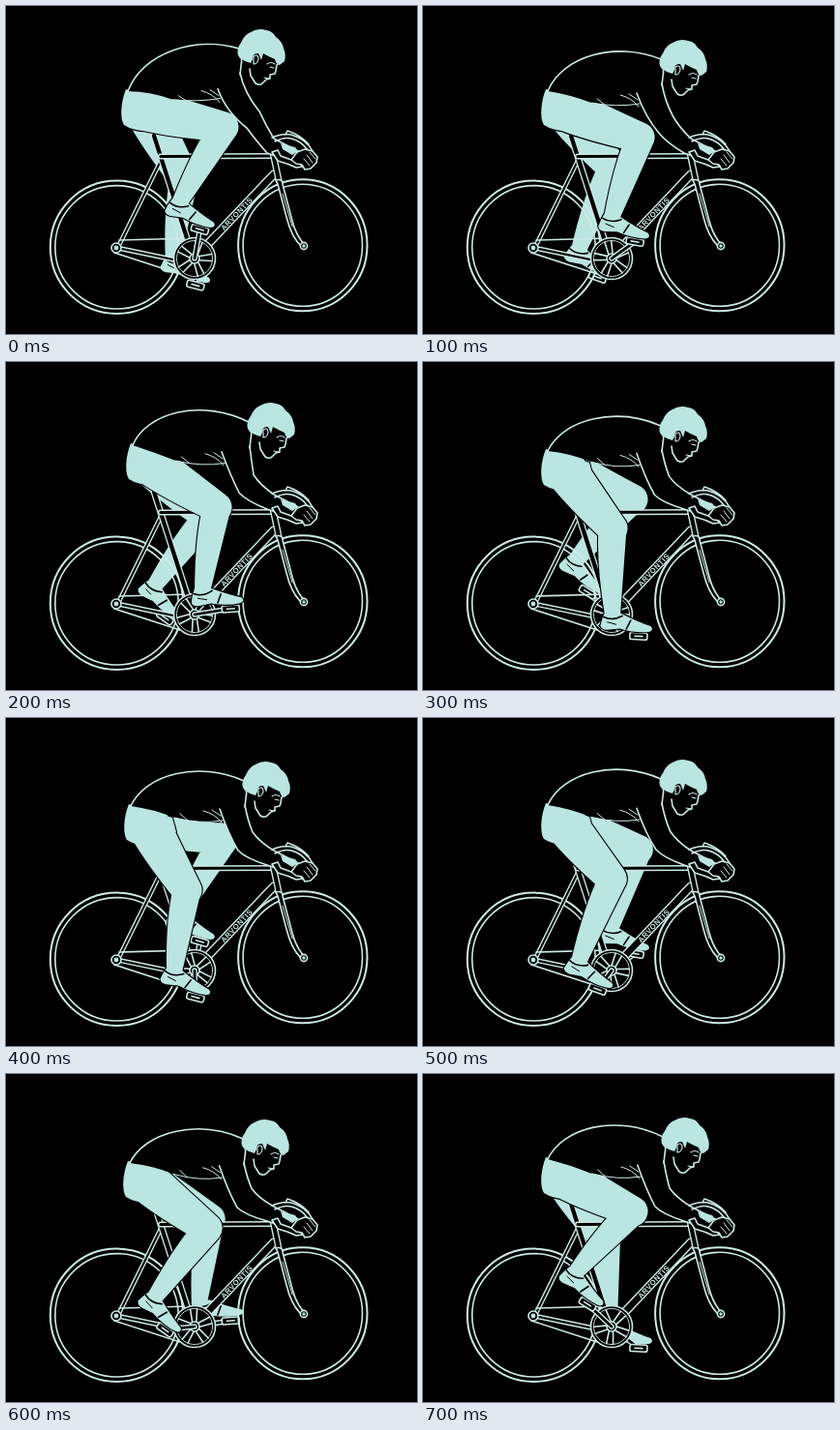
Recreate the animation shown at these times as an HTML page. Size 425 px wide and 339 px high, loop 0.8 s.

```html
<!DOCTYPE html>
<html lang="en">
<head>
<meta charset="utf-8">
<title>Cyclist</title>
<style>
  html, body { margin: 0; width: 100%; height: 100%; overflow: hidden; background: #000; }
  svg { display: block; width: 100vw; height: 100vh; }
  .line { fill: none; stroke: #cdeae4; stroke-width: 1.6; stroke-linecap: round; stroke-linejoin: round; }
  .solid { fill: #bae5e0; }
  .leg { fill: #bae5e0; stroke: #000; stroke-width: 2.2; paint-order: stroke; stroke-linejoin: round; }
  .ink { fill: none; stroke: #000; stroke-width: 1.6; stroke-linecap: round; }
  .mask { fill: #000; }
  text { font: bold 7.6px "Liberation Sans", Arial, sans-serif; fill: #cdeae4; letter-spacing: .6px; }
</style>
</head>
<body>
<svg viewBox="0 0 425 339" preserveAspectRatio="none">
  <rect width="425" height="339" class="mask"/>
  <g id="farLeg"></g>
  <g id="farPedal"></g>
  <g id="bike"></g>
  <g transform="translate(195 261)">
    <circle r="21.5" class="line" style="fill:#000"/>
    <circle r="18.5" class="line" stroke-dasharray="3 1" style="stroke-width:1"/>
    <g id="spider"></g>
    <circle r="5" class="line" style="fill:#000"/>
    <circle r="1.6" class="solid"/>
  </g>
  <g id="nearPedal"></g>
  <g id="nearLeg"></g>
  <g id="body"></g>
  <g>
    <path class="line" d="M275 136Q286 131 295 133Q311 138 317 150M278 140Q288 135 295 137Q306 140 312 149M289 133L291 129Q304 133 313 143"/>
    <path class="line" style="fill:#000" d="M275 151L281 160Q292 163 300 167L307 166Q300 158 295 159L284 155L281 149Z"/>
    <path class="solid" d="M284 142L299 146 302 150 296 154 286 148Z"/>
    <path class="line" style="fill:#000" d="M295 159L301 151 309 148 317 150 322 156 321 162 315 168 309 169 306 164 300 163Z"/>
    <path class="line" style="stroke-width:1" d="M311 154L317 162M308 158L314 165M314 151L320 158"/>
  </g>
</svg>
<script>
const STEP = 100;
const HUB = { x: 195, y: 261 };
const HIP = { x: 147, y: 110 };

// knee x, knee y, ankle x, ankle y, sole angle
const LEG = [
  [226, 125, 179, 204, 16],
  [225, 136, 195, 219, 10],
  [218, 150, 203, 237, -4],
  [196, 172, 196, 262, 3],
  [187, 178, 174, 262, 15],
  [196, 167, 161, 252, 20],
  [209, 160, 153, 232, 35],
  [217, 142, 157, 206, 32]
];
// head shift x, y, waist shift x, y
const SWAY = [
  [-5, -21, -3, -3], [0, -10, 0, -3], [5, -3, 2, -5], [0, 1, 0, 1],
  [0, 0, 0, 0], [0, -2, 0, -1], [-1, 2, -1, 1], [2, 0, 0, -3]
];

const el = id => document.getElementById(id);
const pt = (x, y) => x.toFixed(1) + " " + y.toFixed(1);
const path = (cls, d, extra = "") => `<path class="${cls}" d="${d}" ${extra}/>`;
const oval = (x, y, rx, ry, extra = "") =>
  `<ellipse class="line" cx="${x}" cy="${y}" rx="${rx}" ry="${ry}" ${extra}/>`;

function tube(x1, y1, x2, y2, w) {
  const d = `M${x1} ${y1}L${x2} ${y2}`;
  return path("line", d, `style="stroke-width:${w}"`) +
         path("ink", d, `style="stroke-width:${w - 2.8}"`);
}

// tapered limb with round ends; bulge swells the rear side
function limb(a, ra, b, rb, bulge) {
  const len = Math.hypot(b.x - a.x, b.y - a.y);
  const nx = -(b.y - a.y) / len, ny = (b.x - a.x) / len;
  const off = (p, r) => pt(p.x + nx * r, p.y + ny * r);
  const mid = { x: a.x * .6 + b.x * .4, y: a.y * .6 + b.y * .4 };
  const rm = ra * .6 + rb * .4;
  return `M${off(a, ra)}Q${off(mid, rm + bulge)} ${off(b, rb)}` +
    `A${rb} ${rb} 0 0 0 ${off(b, -rb)}Q${off(mid, -rm)} ${off(a, -ra)}A${ra} ${ra} 0 0 0 ${off(a, ra)}Z`;
}

// tuck pulls the knee back during the downstroke
function legPose(k, tuck) {
  const [kx, ky, ax, ay, deg] = LEG[k % 8];
  const c = Math.cos(deg * Math.PI / 180), s = Math.sin(deg * Math.PI / 180);
  const foot = (x, y) => ({ x: ax + x * c - y * s, y: ay + x * s + y * c });
  const pull = tuck * Math.max(0, Math.cos((k - 2.5) * Math.PI / 4));
  return { knee: { x: kx - pull, y: ky }, ankle: { x: ax - pull / 2, y: ay }, deg, foot, pedal: foot(28, 20) };
}

function drawLeg(p, dx, dy) {
  const f = (x, y) => { const q = p.foot(x, y); return pt(q.x, q.y); };
  const at = (x, y) => pt(x + dx, y + dy);
  const hip = { x: HIP.x + dx, y: HIP.y + dy };
  const seat = `M${at(127, 89)}C${at(122.5, 100)} ${at(120, 118)} ${at(125, 126)}` +
    `Q${at(136, 133)} ${at(152, 132)}L${at(176, 118)}L${at(172, 103)}Z`;
  const shoe = `M${f(-8, -3)}Q${f(-11, 4)} ${f(-12, 11)}Q${f(-11, 15)} ${f(-5, 15)}L${f(8, 13)}` +
    `Q${f(24, 17)} ${f(38, 15)}Q${f(44, 13)} ${f(40, 9)}Q${f(26, 5)} ${f(8, -3)}Z`;
  return path("leg", seat + limb(hip, 22, p.knee, 15.5, 3) + limb(p.knee, 14.5, p.ankle, 8, 5) + shoe) +
    path("ink", `M${f(-9, 2)}Q${f(0, 6)} ${f(10, 0)}M${f(19, 4)}L${f(15, 13)}`) +
    path("ink", `M${f(-5, 7)}L${f(4, 9)}`, 'style="stroke-width:1"');
}

function drawPedal(p) {
  const { x, y } = p.pedal;
  return tube(HUB.x, HUB.y, x, y, 5.5) +
    `<g transform="translate(${pt(x, y)}) rotate(${p.deg})">` +
    '<rect x="-9" y="-3.5" width="18" height="7" rx="2" class="line" style="fill:#000"/>' +
    path("line", "M-4 0H4") + "</g>";
}

function drawBike() {
  const wheel = (x, y, rx, ry) =>
    oval(x, y, rx, ry, 'style="stroke-width:2"') + oval(x, y, rx - 5, ry - 5);
  return wheel(114.5, 249.3, 68.7, 68.7) + wheel(306.8, 247.3, 66.7, 68) +
    tube(160, 160, 117.5, 246, 4.8) +
    tube(115, 250, 192, 266, 5) +
    path("line", "M117 242L192 240M112 255L180 277") +
    tube(153, 134, 190, 249, 7) +
    tube(160, 155.5, 277, 155, 6) +
    tube(277, 174, 203, 252, 9.4) +
    tube(276, 152, 282, 180, 7) +
    path("line", "M279 180Q286 178 286 184L296 222Q300 238 310 248L306 249Q295 239 290 218L281 184Z", 'style="fill:#000"') +
    path("line", "M286 194L296 228", 'style="stroke-width:1"') +
    oval(308, 248, 3.6, 3.6, 'style="fill:#000"') + oval(114, 250, 5, 5, 'style="fill:#000"') +
    '<circle class="solid" cx="308" cy="248" r="1.7"/><circle class="solid" cx="114" cy="250" r="2.4"/>' +
    '<text text-anchor="middle" transform="translate(240.5 216.5) rotate(-46.5)">ARVONTIS</text>';
}

function drawBody([hx, hy, wx, wy]) {
  const w = (x, y) => pt(x + wx, y + wy);
  const h = (x, y) => pt(x + hx, y + hy);
  const mix = (x, y, k) => pt(x + hx * k, y + hy * k);
  const back = `M${w(129, 91)}C${pt(144 + hx * .35, 58 + hy * .35 + wy)} ` +
    `${pt(199 + hx * .5, 44 + hy * .5 + wy)} ${h(246, 65)}`;
  const hem = `Q${mix(201, 109, .5)} ${mix(174, 103, .3)}Q${mix(152, 94, .25)} ${w(129, 91)}`;
  // the elbow swings forward as the head rises
  const upper = `M${h(247, 90)}Q${mix(250, 106, .8)} ${pt(255 - hy * .35, 118 + hy * .4)}` +
    `Q${pt(262 - hy * .3, 128 + hy * .25)} 277 137L302 150`;
  const elbow = pt(240 - hy * .45, 137 + hy * .5);
  const bend = pt(248 - hy * .45, 145 + hy * .35);
  const inner = mix(230, 120, .5), cuff = mix(221, 94, .4);
  return path("mask", back + `L${h(248, 92)}L${mix(226, 108, .5)}${hem}Z`) +
    path("mask", upper + `L297 161L270 152Q${bend} ${elbow}Q${inner} ${cuff}Z`) +
    path("line", back) +
    path("line", upper + `M${cuff}Q${inner} ${elbow}Q${bend} 270 152L297 161`) +
    path("line", `M${mix(174, 103, .3)}Q${mix(200, 110, .5)} ${mix(224, 106, .5)}M${mix(180, 99, .3)}L${mix(188, 106, .4)}` +
      `M${mix(204, 96, .4)}Q${mix(216, 99, .4)} ${mix(223, 108, .4)}M${mix(213, 95, .4)}L${mix(222, 101, .4)}`,
      'style="stroke-width:1"') +
    `<g transform="translate(${243 + hx} ${45 + hy})">` +
    path("mask", "M2 20L14 50 22 59 30 55 42 45 46 32 20 14Z") +
    path("line", "M3 20Q7 29 5 38L4 47M14 41L15 48 20 56Q25 59 28 55L31 52 35 51 35 47 40 46 41 43 42 37 45 34") +
    path("line", "M32 36Q36 33 40 36M35 39L39 40M29 50L34 51", 'style="stroke-width:1.1"') +
    path("solid", "M2 27Q0 20 5 14Q8 6 15 3Q23 -2 31 1Q38 2 41 8Q48 13 49 20Q52 26 50 33L45 37" +
      "Q41 36 40 31Q33 28 28 25L26 32 23 25Q17 24 17 31L15 35Q8 33 4 30Z") +
    path("line", "M18 28Q23 25 23 31Q22 36 18 36Z", 'style="fill:#000;stroke-width:1.2"') +
    "</g>";
}

function render(ms) {
  const k = Math.floor(ms / STEP) % 8;
  const near = legPose(k, 0), far = legPose((k + 4) % 8, 7);
  const sway = SWAY[k];
  el("farLeg").innerHTML = drawLeg(far, sway[2], sway[3]);
  el("farPedal").innerHTML = drawPedal(far);
  el("nearPedal").innerHTML = drawPedal(near);
  el("nearLeg").innerHTML = drawLeg(near, sway[2], sway[3]);
  el("body").innerHTML = drawBody(sway);
  el("spider").setAttribute("transform", `rotate(${15 + k * 45})`);
}

el("bike").innerHTML = drawBike();
el("spider").innerHTML = [0, 1, 2, 3, 4].map(i =>
  path("line", "M-2 -4L-3.5 -18M2 -4L3.5 -18", `transform="rotate(${i * 72})"`)).join("");

function tick(now) {
  render(now);
  requestAnimationFrame(tick);
}
render(0);
requestAnimationFrame(tick);
</script>
</body>
</html>
```
